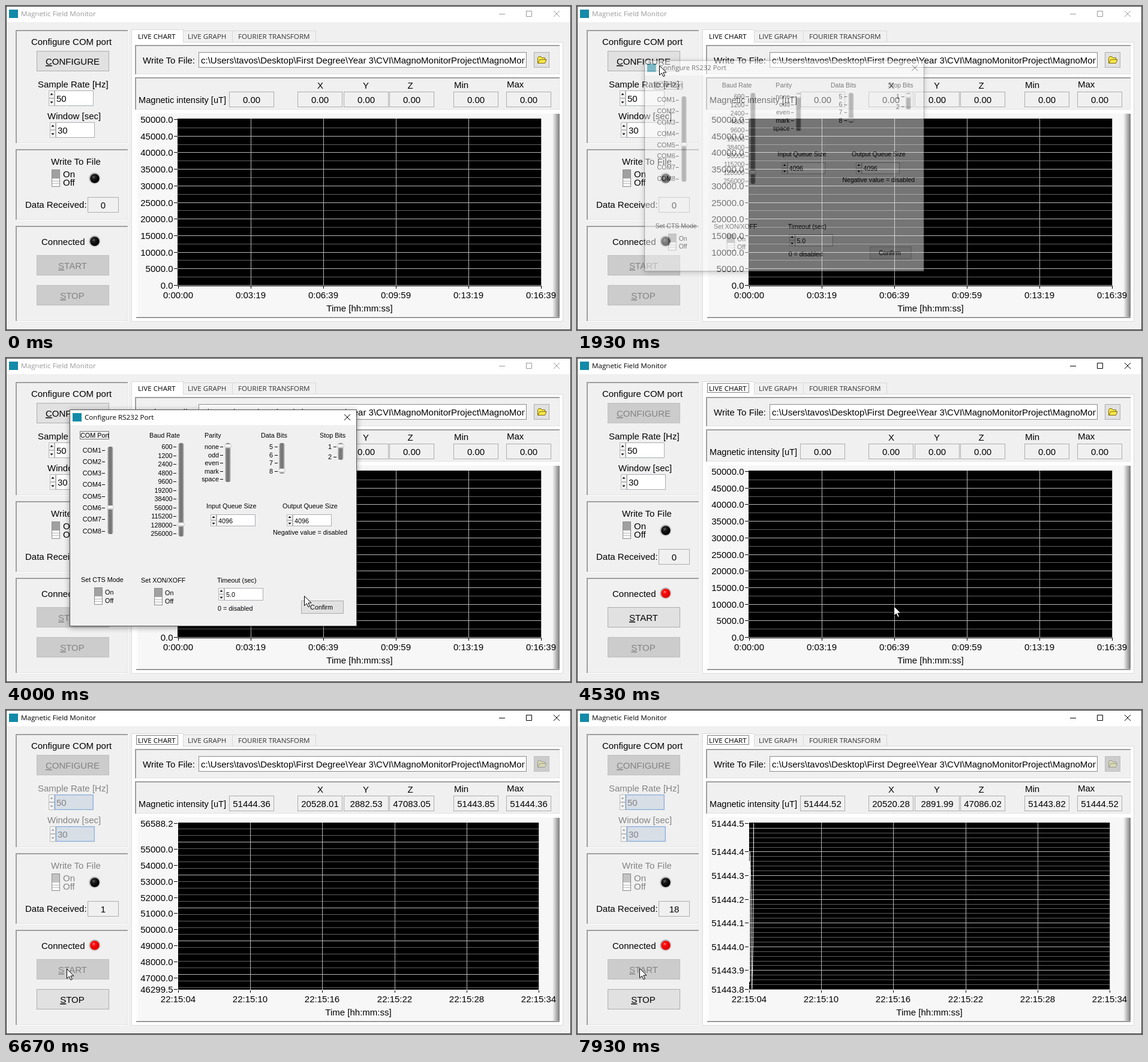
An HTML page for the animation above (8 s loop, 942 px wide and 541 px high).

```html
<!DOCTYPE html>
<html lang="en">
<head>
<meta charset="utf-8">
<title>Magnetic Field Monitor</title>
<style>
html, body { margin: 0; width: 100%; height: 100%; overflow: hidden; background: #f0f0f0; }
svg { display: block; width: 942px; height: 541px; }
.m { font: 15px "Liberation Sans", Arial, sans-serif; }
.n { font: 14.6px "Liberation Sans", Arial, sans-serif; }
.d { font: 10.8px "Liberation Sans", Arial, sans-serif; }
.w { font: 11.65px "Open Sans", "Noto Sans", sans-serif; }
#dialog { transform-origin: 346px 267px; filter: drop-shadow(0 2px 5px #0006); }
</style>
</head>
<body>
<svg viewBox="0 0 942 541">
  <defs>
    <radialGradient id="off" cx=".38" cy=".35"><stop stop-color="#666"/><stop offset=".35" stop-color="#222"/><stop offset="1" stop-color="#000"/></radialGradient>
    <radialGradient id="on" cx=".38" cy=".35"><stop stop-color="#ff8a8a"/><stop offset=".35" stop-color="#ff1010"/><stop offset="1" stop-color="#e00000"/></radialGradient>
    <linearGradient id="ring" x2="1" y2="1"><stop stop-color="#aaa"/><stop offset="1" stop-color="#ececec"/></linearGradient>
    <linearGradient id="edge"><stop stop-color="#f7f7f7"/><stop offset="1" stop-color="#7c7c7c"/></linearGradient>
    <linearGradient id="track"><stop stop-color="#aaa"/><stop offset=".3" stop-color="#777"/><stop offset=".7" stop-color="#777"/><stop offset="1" stop-color="#bbb"/></linearGradient>
    <linearGradient id="thumb" x2="0" y2="1"><stop stop-color="#fff"/><stop offset=".6" stop-color="#f4f4f4"/><stop offset="1" stop-color="#bbb"/></linearGradient>
    <clipPath id="field"><rect x="323" y="78" width="542" height="24"/></clipPath>
    <clipPath id="plot"><rect x="286" y="188" width="608" height="280"/></clipPath>
  </defs>
  <g id="main"></g>
  <g id="dialog"></g>
  <path id="cursor" d="M.5 .5V16.5L4.3 13 7 18.8 9.4 17.7 6.8 12H12Z" fill="#fff" stroke="#000"/>
</svg>
<script>
const LOOP = 8000, GRAY = '#838383';
const $ = id => document.getElementById(id);

const rect = (x, y, w, h, fill, more = '') =>
  `<rect x="${x}" y="${y}" width="${w}" height="${h}" fill="${fill}" ${more}/>`;
const box = (x, y, w, h, fill, line) => rect(x, y, w, h, line) + rect(x + 1, y + 1, w - 2, h - 2, fill);
const path = (d, color, more = '') => `<path d="${d}" fill="none" stroke="${color}" ${more}/>`;
const text = (x, y, s, { font = 'm', at = 'start', color = '#000' } = {}) =>
  `<text x="${x}" y="${y}" class="${font}" text-anchor="${at}" fill="${color}">${s}</text>`;
const small = (x, y, s, at) => text(x, y, s, { font: 'd', at });
const mid = (x, y, s, color) => text(x, y, s, { at: 'middle', color });
const dotted = (x, y, w, h) =>
  rect(x + .5, y + .5, w, h, 'none', 'stroke="#000" stroke-dasharray="1 1"');

const sunken = (x, y, w, h) => rect(x, y, w, h, '#fff') + rect(x, y, w - 1, h - 1, '#a0a0a0') +
  rect(x + 2, y + 2, w - 4, h - 4, '#f0f0f0') +
  path(`M${x + w - 1.5} ${y + 2}V${y + h - 1.5}H${x + 2}`, '#e3e3e3');

// look: 'off', 'hot' or normal
function button(x, y, w, h, look) {
  const [fill, line] = { off: ['#ccc', '#bfbfbf'], hot: ['#e5f1fb', '#0078d7'] }[look] || ['#e1e1e1', '#adadad'];
  return box(x, y, w, h, fill, line);
}
function bigButton(y, s, cx, look) {
  return button(51, y, 121, 34, look) +
    mid(cx, y + 23, `<tspan text-decoration="underline">${s[0]}</tspan>${s.slice(1)}`, look == 'off' ? GRAY : '#000');
}
function spinner(x, y, h, s, font, off) {
  const c = off ? '#999' : '#000', half = h / 2, cx = x + 5;
  const arrow = (cy, d) => `<path d="M${cx - 2.5} ${cy + d}h5l-2.5 ${-3 * d}z" fill="${c}"/>`;
  return box(x, y, 10, half, '#f4f4f4', '#bbb') + box(x, y + half, 10, half, '#f4f4f4', '#bbb') +
    arrow(y + half / 2, 1) + arrow(y + half * 1.5, -1) +
    (off ? box(x + 10, y, 65, h, '#b9cfe8', '#8fb0d8') + rect(x + 12, y + 2, 61, h - 4, '#d8dee6')
         : box(x + 10, y, 65, h, '#fff', '#abadb3')) +
    text(x + 13, y + half + (font == 'm' ? 6 : 4.5), s, { font, color: off ? GRAY : '#000' });
}
function toggle(x, y, font, off) {
  const color = off ? GRAY : '#000', tx = x + (font == 'm' ? 19 : 18), ty = y + (font == 'm' ? 13 : 12);
  return box(x, y, 14, 29, off ? '#c4c4c4' : '#a0a0a0', '#8c8c8c') +
    rect(x + 1, y + 15, 12, 13, '#fafafa') + path(`M${x + 1} ${y + 19.5}h12m-12 4h12`, '#bbb') +
    text(tx, ty, 'On', { font, color }) + text(tx, ty + 14, 'Off', { font, color });
}
const led = (y, on) => `<circle cx="148" cy="${y}" r="10" fill="url(#ring)"/>
  <circle cx="148" cy="${y}" r="7.8" fill="url(#${on ? 'on' : 'off'})"/>`;
const readout = (x, y, w, s) => box(x, y, w, 26, '#f0f0f0', '#adadad') + mid(x + w / 2, y + 19, s);
const cross = (x, y, c) => path(`M${x} ${y}l10 10m0-10l-10 10`, c);
const icon = (x, y) => rect(x, y, 15, 14, '#128ba8');

// samples, in hundredths above BASE
const BASE = 51443.82;
const samples = [54, 3, 58, 56, 51, 48, 43, 40, 20, 8, 0, 5, 8, 14, 20, 40, 56, 70].map(v => BASE + v / 100);

function chart(n) {
  const left = n ? 287 : 286, right = n ? 889 : 893, top = 189, bottom = 466;
  const seen = samples.slice(0, Math.max(n, 2));
  let lo = 0, hi = 50000, step = 5000, grid = 2500, major = 2;
  if (n == 1) [lo, hi, step] = [46299.5, 56588.2, 1000];
  if (n > 1) [lo, hi, step, grid, major] = [Math.min(...seen), Math.max(...seen), .1, .02, 5];
  const toY = v => bottom - (v - lo) / (hi - lo) * (bottom - top);
  const hline = (y, bright) => rect(left, Math.round(y), right - left, 1, bright ? '#b8b8b8' : '#606060');
  const label = (y, v) => text(278.5, y + 6, v.toFixed(1), { at: 'end' }) + rect(280, Math.round(y), 6, 1, '#000');

  let out = rect(left, 188, right - left, n ? 279 : 280, '#000');
  if (n == 1) for (let k = -2; k < 23; k++) out += hline(440.62 - 11.05 * k, k % 5 == 0);
  else for (let k = Math.ceil(lo / grid); k * grid < hi; k++) out += hline(toY(k * grid), k % major == 0);

  const times = n ? ['04', 10, 16, 22, 28, 34].map(s => '22:15:' + s)
                  : ['0:00:00', '0:03:19', '0:06:39', '0:09:59', '0:13:19', '0:16:39'];
  times.forEach((s, i) => {
    const x = Math.round(287 + i * (right - 288) / 5);
    if (i) out += rect(x, 188, 1, 279, '#b8b8b8');
    out += rect(x, 468, 1, 4, '#000') + mid(x, 488, s);
  });
  out += label(bottom, lo) + label(top, hi);
  for (let k = Math.ceil(lo / step); k * step < hi; k++) {
    const y = toY(k * step);
    if (y - top > 18 && bottom - y > 16) out += label(y, k * step);
  }
  if (n > 1) out += path('M' + seen.map((v, i) => `${(287.5 + i * .42).toFixed(2)} ${toY(v).toFixed(1)}`).join('L'),
    '#fff', 'clip-path="url(#plot)"');
  return out + mid(n ? 587.5 : 589.5, 510, 'Time [hh:mm:ss]');
}

function mainWindow({ active, connected, hotConfig, hotStart, n }) {
  const run = n > 0, ink = active ? '#000' : '#999', dim = run ? GRAY : '#000';
  const u = Math.max(0, n - 1) / 17, wave = Math.sin(u * Math.PI * 6);
  const seen = samples.slice(0, Math.max(n, 2));
  const nums = run ? [samples[n - 1], 20528.01 - 7.73 * u + 4 * wave, 2882.53 + 9.46 * u - 3 * wave,
    47083.05 + 2.97 * u - 2 * wave, Math.min(...seen), Math.max(...seen)] : Array(6).fill(0);
  const tab = (x, s, color) => text(x, 55, s, { font: 'w', color });
  const folder = run ? '#999' : '#7d6a00';

  return box(0, 0, 942, 541, '#f0f0f0', '#3c3c3c') + rect(1, 1, 940, 26, '#fff') + icon(5, 6) +
    text(25, 17, 'Magnetic Field Monitor', { font: 'w', color: ink }) +
    path('M822 13.5h10M867.5 8.5h9v9h-9z', ink) + cross(913, 8, ink) +
    // left column
    sunken(16, 40, 188, 190) + sunken(16, 239, 188, 119) + sunken(16, 367, 188, 160) +
    mid(109, 65, 'Configure COM port') +
    bigButton(75, 'CONFIGURE', 111, connected ? 'off' : hotConfig ? 'hot' : '') +
    text(53, 136, 'Sample Rate [Hz]', { color: dim }) + spinner(71, 141, 26, '50', 'm', run) +
    text(69, 189, 'Window [sec]', { color: dim }) + spinner(73, 194, 26, '30', 'm', run) +
    text(75, 265, 'Write To File', { color: dim }) + toggle(76, 273, 'm', run) + led(288) +
    text(32, 337, 'Data Received:') + readout(136, 319, 52, n) +
    text(59, 399, 'Connected') + led(393, connected) +
    bigButton(416, 'START', 111, !connected || run ? 'off' : hotStart ? 'hot' : '') +
    bigButton(466, 'STOP', 110.5, run ? '' : 'off') +
    // tabs
    box(209, 60, 720, 467, '#fff', '#dcdcdc') + box(295, 41, 83, 20, '#f0f0f0', '#d9d9d9') +
    box(377, 41, 140, 20, '#f0f0f0', '#d9d9d9') + box(209, 39, 87, 22, '#fff', '#d9d9d9') +
    rect(210, 58, 85, 4, '#fff') + tab(220, 'LIVE CHART') + tab(303, 'LIVE GRAPH', '#333') +
    tab(387, 'FOURIER TRANSFORM', '#333') + (connected ? dotted(217, 42, 69, 15) : '') +
    // file row
    sunken(215, 65, 709, 50) + text(228, 96, 'Write To File:') + box(321, 77, 547, 26, '#fff', '#8a8a8a') +
    `<g clip-path="url(#field)">${text(325, 96,
      String.raw`c:\Users\tavos\Desktop\First Degree\Year 3\CVI\MagnoMonitorProject\MagnoMon`)}</g>` +
    button(880, 77, 26, 26, run ? 'off' : '') +
    `<path d="M886.5 95.5v-9l1.5-2h4l1.5 2h5v3h2.5l-2.5 6z" fill="${run ? '#d8d8b0' : '#ffe94a'}" stroke="${folder}"/>` +
    path('M887 95l3-5.5h10', folder) +
    // readouts
    sunken(215, 119, 709, 55) + text(221, 162, 'Magnetic intensity [uT]', { font: 'n' }) +
    mid(524, 138, 'X') + mid(600, 138, 'Y') + mid(674, 138, 'Z') + text(747, 137, 'Min') + text(835, 136, 'Max') +
    [372, 486, 563, 639, 746, 834].map((x, i) => readout(x, 143, 75, nums[i].toFixed(2))).join('') +
    // chart panel
    rect(216, 179, 707, 342, '#f7f7f7') + rect(216, 179, 4, 340, '#fcfcfc') + rect(911, 180, 12, 341, 'url(#edge)') +
    rect(217, 519, 706, 1, '#bbb') + rect(217, 520, 706, 1, '#777') + chart(n);
}

function slider(labels, endX, tickX, y, step, cx, top, bottom, thumbY) {
  return labels.map((s, i) => small(endX, y + i * step + 4, s, 'end') +
      rect(tickX, Math.round(y + i * step), 5, 1, '#000')).join('') +
    rect(cx - 4.5, top, 9, bottom - top, 'url(#track)', 'rx="3.5"') +
    rect(cx - 5.5, thumbY - 3, 11, 6, 'url(#thumb)', 'rx="3" stroke="#ccc"');
}

function dialogWindow(port, hotConfirm) {
  const coms = [1, 2, 3, 4, 5, 6, 7, 8].map(i => 'COM' + i);
  const bauds = [600, 1200, 2400, 4800, 9600, 19200, 38400, 56000, 115200, 128000, 256000];
  return box(106, 86, 479, 362, '#f0f0f0', '#555') + rect(107, 87, 477, 25, '#fff') + icon(111, 92) +
    text(131, 103, 'Configure RS232 Port', { font: 'w' }) + cross(564, 94, '#000') +
    small(124, 133, 'COM Port') + dotted(123, 122, 48, 13) +
    slider(coms, 159, 160, 153.5, 19.3, 174, 148, 294, 153.5 + 19.2 * (port - 1)) +
    small(239, 133, 'Baud Rate') + slider(bauds, 277.5, 279, 148, 14.5, 292, 142, 298, 278) +
    small(331, 133, 'Parity') +
    slider(['none', 'odd', 'even', 'mark', 'space'], 355, 357, 148, 13.6, 370, 142, 207, 147) +
    small(425, 133, 'Data Bits') + slider([5, 6, 7, 8], 445, 448, 148, 13.6, 460, 142, 193, 188) +
    small(523, 133, 'Stop Bits') + slider([1, 2], 543, 546, 148, 17, 558, 142, 170, 147) +
    small(334, 251, 'Input Queue Size') + spinner(341, 261, 20, '4096', 'd') +
    small(461, 251, 'Output Queue Size') + spinner(468, 261, 20, '4096', 'd') +
    small(445, 295, 'Negative value = disabled') +
    small(125, 374, 'Set CTS Mode') + toggle(147, 383, 'd') +
    small(225, 375, 'Set XON/XOFF') + toggle(247, 384, 'd') +
    small(352, 375, 'Timeout (sec)') + spinner(354, 384, 21, '5.0', 'd') + small(353, 422, '0 = disabled') +
    button(492, 405, 71, 22, hotConfirm ? 'hot' : '') + small(526, 420, 'Confirm', 'middle');
}

// pointer: time, x, y
const stops = [[690, 219, 545], [1130, 185, 270], [1530, 137, 98], [2500, 138, 101], [2930, 188, 195], [3330, 174, 249],
  [3700, 174, 249], [4000, 497, 397], [4170, 528, 414], [4900, 528, 414], [5190, 330, 404], [5530, 101, 432],
  [6670, 101, 432], [7930, 104, 431]];
function pointer(t) {
  const i = stops.findIndex(s => s[0] > t);
  if (i <= 0) return (i ? stops.at(-1) : stops[0]).slice(1);
  const [a, b] = [stops[i - 1], stops[i]], u = (t - a[0]) / (b[0] - a[0]), e = u * u * (3 - 2 * u);
  return [1, 2].map(k => Math.round(a[k] + (b[k] - a[k]) * e));
}

const last = {};
function put(id, html) {
  if (last[id] !== html) $(id).innerHTML = last[id] = html;
}
const clamp = v => Math.min(1, Math.max(0, v));

function draw(now) {
  const t = now % LOOP;
  const clicked = t >= 1730 && t < 1860;
  put('main', mainWindow({
    active: clicked || t >= 4330,
    connected: t >= 4460,
    hotConfig: clicked,
    hotStart: t >= 5460,
    n: t < 6590 ? 0 : Math.min(18, Math.max(1, 1 + Math.floor((t - 6670) / 72)))
  }));
  put('dialog', dialogWindow(t < 3400 ? 5 : 6, t >= 4060));
  const show = Math.sin(clamp((t - 1850) / 250) * Math.PI / 2) * (1 - clamp((t - 4230) / 200));
  $('dialog').style.opacity = show;
  $('dialog').style.transform = show < 1 ? `scale(${.95 + .05 * show})` : 'none';
  $('cursor').setAttribute('transform', `translate(${pointer(t)})`);
  requestAnimationFrame(draw);
}
requestAnimationFrame(draw);
</script>
</body>
</html>
```
